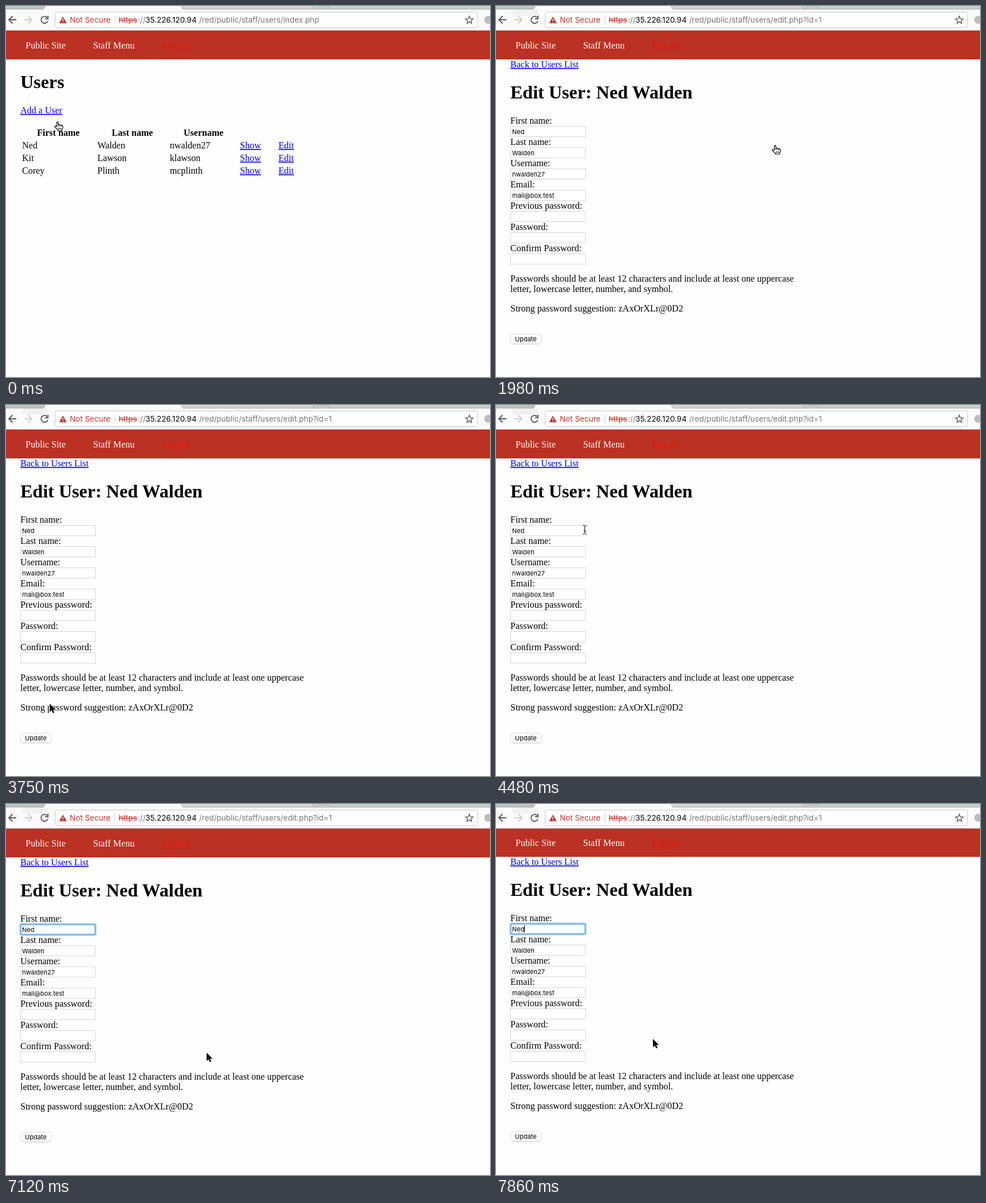
An HTML page that plays this animation: 842x646 px, repeating every 8000 ms.

```html
<!DOCTYPE html>
<html lang="en">
<head>
<meta charset="utf-8">
<title>User admin</title>
<style>
html, body { margin: 0; width: 100%; height: 100%; overflow: hidden; background: #fefefe; }
svg { display: block; width: 842px; height: 646px; }
text { white-space: pre; }
.page text { font: 16px "Liberation Serif", "Times New Roman", serif; }
.page .h1 { font-size: 32px; font-weight: bold; }
.page .th { font-weight: bold; }
.page .link { fill: #0000ee; text-decoration: underline; }
.page .ui { font: 11px Inter, sans-serif; }
.bar text { font: 13.4px Inter, sans-serif; }
</style>
</head>
<body>
<svg id="stage" viewBox="0 0 842 646" xmlns="http://www.w3.org/2000/svg">
  <defs>
    <clipPath id="view"><rect y="43" width="842" height="603"/></clipPath>
  </defs>
  <rect width="842" height="646" fill="#fefefe"/>

  <g class="page" clip-path="url(#view)">
    <g id="scroll">
      <rect y="33" width="842" height="60" fill="#bb3123"/>
      <g fill="#fff">
        <text x="34" y="74">Public Site</text>
        <text x="151.5" y="74">Staff Menu</text>
        <text x="272" y="74" fill="#ff0a0a">Log out</text>
      </g>
      <g id="list"></g>
      <g id="edit"></g>
    </g>
  </g>

  <g class="bar">
    <rect width="842" height="42" fill="#fbfbfb"/>
    <rect width="842" height="5.5" fill="#c3d0cb"/>
    <path d="M0 0H68L66 5.5H0Z" fill="#bcc4c1"/>
    <path d="M305 0H533L536 5.5H307Z" fill="#d3d4d3"/>
    <path d="M538 0H565L563 2H541Z" fill="#b9c2be"/>
    <path d="M68 0H305L307 6H66Z" fill="#fbfbfb"/>
    <path d="M0 5.5H65Q67 4 68 0M305 0Q306 5 309 5.5H842M533 0Q535 5 538 5.5" fill="none" stroke="#a5aaa8"/>
    <rect id="patch" x="29" y="6" width="45" height="11" fill="#f1f1f1"/>
    <rect y="42" width="842" height="1" fill="#c4b2b0"/>
    <g fill="none" stroke="#5a5a5a" stroke-width="1.9">
      <path d="M18 24H5.5M11.5 17.5L5 24L11.5 30.5"/>
      <path d="M32 24H44.500M38.500 17.500L45 24L38.500 30.500" stroke="#cfcfcf"/>
      <path id="reload" d="M71.500 20A6 6 0 1 0 72.800 26M73 17V22.200H67.800"/>
      <path id="stop" d="M62 19L72 29M72 19L62 29"/>
    </g>
    <rect x="85.500" y="10.500" width="735" height="27" rx="3" fill="#fff" stroke="#c9c9c9"/>
    <path d="M99 18.500L105.500 30H92.500Z" fill="#c5372c"/>
    <path d="M99 22.500V26M99 27.200V28.600" stroke="#fff" stroke-width="1.400"/>
    <text x="111" y="29" fill="#c5372c">Not Secure</text>
    <path d="M189.500 16V32" stroke="#cfcfcf"/>
    <text x="196" y="29" fill="#c5372c" text-decoration="line-through">https</text>
    <text x="229.500" y="29" fill="#757575">://</text>
    <text x="242.500" y="29">35.226.120.94</text>
    <text id="path" x="336" y="29" fill="#757575"></text>
    <path id="star" fill="none" stroke="#555" stroke-width="1.300"/>
    <circle cx="839" cy="24" r="7" fill="#bdbdbd"/>
  </g>

  <g id="cursor">
    <path id="arrow" d="M0 0V14.500L3.400 11.400L5.700 16.600L8 15.600L5.800 10.500H10.400Z" stroke="#fff" stroke-width="1.400" paint-order="stroke"/>
    <g id="hand" stroke="#000" stroke-width="1.200" stroke-linejoin="round">
      <path fill="#fff" d="M.3 9V2Q.3 .6 1.600 .6T2.900 2V6Q4.300 4.900 5.500 6.200Q7.200 5.500 8.200 6.900Q10.800 6.500 10.800 9V11.500L9.300 14V16H2V14.500L-3 9.600Q-3.800 7.500 -1.600 7.900Z"/>
      <path fill="none" d="M2.900 6V9M5.500 6.200V9M8.200 6.900V9M3.500 11V14M5.500 11V14M7.500 11V14" stroke-width=".9"/>
    </g>
    <g id="beam" fill="none"></g>
  </g>
</svg>
<script>
const $ = id => document.getElementById(id);
const text = (x, y, s, cls = "") => `<text x="${x}" y="${y}" class="${cls}">${s}</text>`;
const show = (id, on) => $(id).setAttribute("display", on ? "inline" : "none");
const move = (id, x, y) => $(id).setAttribute("transform", `translate(${x} ${y})`);

// User list
const users = [
  ["Ned", "Walden", "nwalden27"],
  ["Kit", "Lawson", "klawson"],
  ["Corey", "Plinth", "mcplinth"]
];
const cols = [28, 159, 285, 407, 474];
$("list").innerHTML =
  text(25, 143, "Users", "h1") + text(25, 187, "Add a User", "link") +
  text(54, 226, "First name", "th") + text(184, 226, "Last name", "th") +
  text(309, 226, "Username", "th") +
  users.map((u, r) => [...u, "Show", "Edit"].map((s, c) =>
    text(cols[c], 248 + 22 * r, s, c > 2 ? "link" : "")).join("")).join("");

// Edit form
const fields = [
  ["First name:", "Ned"], ["Last name:", "Walden"], ["Username:", "nwalden27"],
  ["Email:", "mail@box.test"], ["Previous password:", ""], ["Password:", ""],
  ["Confirm Password:", ""]
];
const box = (y, extra) => `<rect x="25.5" y="${y}" width="130" height="18" ${extra}/>`;
$("edit").innerHTML =
  text(25, 107, "Back to Users List", "link") +
  text(25, 161, "Edit User: Ned Walden", "h1") +
  fields.map(([label, value], i) => {
    const y = 205 + 37 * i;
    return text(25, y, label) + box(y + 4.5, 'fill="#fff" stroke="#d6d6d6"') +
      text(28, y + 18, value, "ui");
  }).join("") +
  `<g id="ring" fill="none">${box(209.5, 'rx="1.5" stroke="#b3d6fb" stroke-width="4"')}
    ${box(209.5, 'rx="1" stroke="#74b1f3" stroke-width="2"')}</g>
  <path id="caret" stroke="#000"/>` +
  text(25, 480, "Passwords should be at least 12 characters and include at least one uppercase") +
  text(25, 498, "letter, lowercase letter, number, and symbol.") +
  text(25, 532, "Strong password suggestion: zAxOrXLr@0D2") +
  `<rect x="25.5" y="571.5" width="53" height="17" rx="3.5" fill="#fff" stroke="#dadada"/>
  <path d="M28 588.500H76" stroke="#c4c4c4"/>` +
  text(33, 584, "Update", "ui");

// Bookmark star and text cursor
$("star").setAttribute("d", "M" + Array.from({ length: 10 }, (_, i) => {
  const r = i % 2 ? 3 : 7, a = Math.PI * (i / 5 - 0.5);
  return (806 + r * Math.cos(a)).toFixed(1) + " " + (24.6 + r * Math.sin(a)).toFixed(1);
}).join("L") + "Z");
const beam = "M-3 -7.500Q0 -7.500 .5 -6Q1 -7.500 4 -7.500M.5 -6V6.500M-3 8Q0 8 .5 6.500Q1 8 4 8M-1.500 2.500H2.500";
$("beam").innerHTML = `<path d="${beam}" stroke="#fff" stroke-width="3"/><path d="${beam}" stroke="#000"/>`;

// Pointer stops: tick, x, y
const stops = [
  [-1, 88, 201], [0, 104, 214], [2, 260, 254], [4, 410, 264], [6, 484, 242],
  [12, 484, 242], [13, 450, 249], [15, 318, 272], [17, 203, 282], [18, 165, 305],
  [20, 101, 391], [21, 90, 470], [23, 62, 569], [24, 72, 540], [25, 130, 390],
  [26, 169, 255], [27, 154, 217], [28, 153, 219], [30, 149, 224], [32, 146, 220],
  [34, 136, 198], [35, 130, 182], [36, 126, 225], [37, 118, 221], [39, 128, 223],
  [41, 134, 226], [42, 134, 226], [43, 190, 285], [44, 292, 388], [45, 349, 433],
  [46, 349, 433], [47, 332, 428], [48, 290, 414], [49, 290, 414], [50, 273, 409]
];

function pointer(k) {
  const i = Math.max(1, stops.findIndex(s => s[0] >= k));
  const [a, x, y] = stops[i - 1], [b, u, v] = stops[i];
  const p = (k - a) / (b - a);
  return [x + (u - x) * p, y + (v - y) * p];
}

const within = (k, a, b) => k >= a && k <= b;

function shape(k, x, y) {
  if (k < 0 || within(k, 4, 12)) return "hand";
  if (k > 26 && within(x, 25, 156) && within(y, 209, 228)) return "beam";
  return "arrow";
}

function draw(t) {
  const k = t < 500 ? -1 : Math.min(50, Math.floor((t - 500) / 147.2 + 0.12));
  const [x, y] = pointer(k).map(Math.round);
  const kind = shape(k, x, y), editing = k >= 9;
  for (const id of ["arrow", "hand", "beam"]) show(id, id === kind);
  move("cursor", x, y);
  show("list", !editing);
  show("edit", editing);
  show("patch", editing);
  show("stop", k === 9);
  show("reload", k !== 9);
  $("path").textContent = "/red/public/staff/users/" + (editing ? "edit.php?id=1" : "index.php");
  show("ring", k >= 40);
  show("caret", within(k, 40, 43) || k >= 47);
  move("scroll", 0, k < 47 ? 0 : k === 47 ? -2 : k < 50 ? -3 : -1);
}

const nameBox = $("edit").querySelector(".ui");
function loop() {
  const end = Math.round(28 + nameBox.getComputedTextLength()) + 0.5;
  $("caret").setAttribute("d", `M${end} 212V225`);
  draw(performance.now() % 8000);
  requestAnimationFrame(loop);
}
loop();
</script>
</body>
</html>
```
